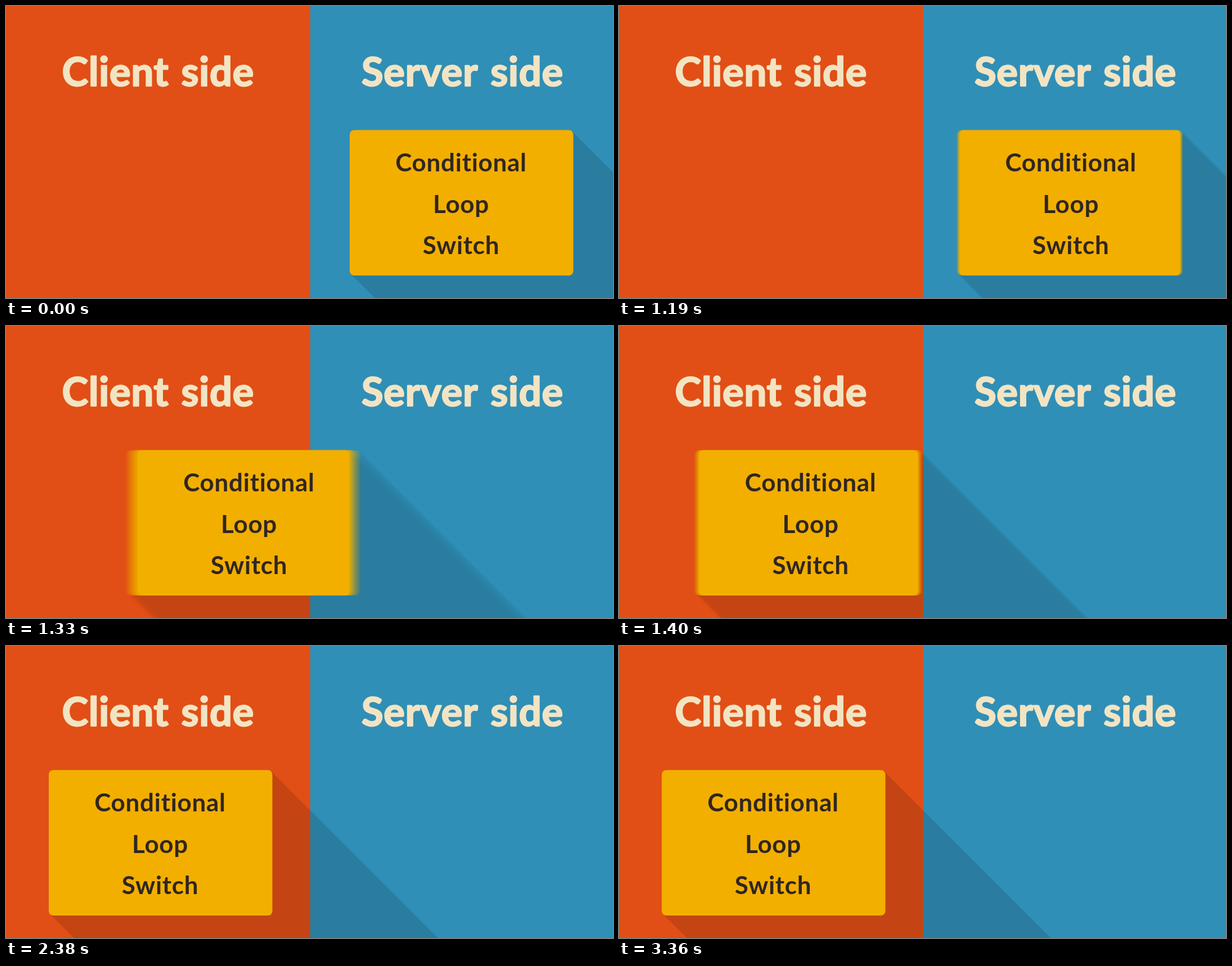
Animation of 1079 by 519 pixels, one loop 3570 ms. Source, as an HTML page with a canvas:

```html
<!DOCTYPE html>
<html lang="en">
<head>
<meta charset="utf-8">
<title>Client side / Server side</title>
<style>
  html, body { margin: 0; width: 100%; height: 100%; overflow: hidden; background: #308fb6; }
  canvas { display: block; }
</style>
</head>
<body>
<canvas id="stage" width="1079" height="519"></canvas>
<script>
const W = 1079, H = 519;
const LOOP = 3570, STEP = 70;
const FONT = 'Lato, "Open Sans", sans-serif';
const card = { from: 611, to: 76, y: 220.4, w: 397.5, h: 258.6, r: 8 };
const move = { start: 1156, length: 465, ease: 0.45 };
const SHUTTER = 12.5, SAMPLES = 16;

const ctx = document.getElementById('stage').getContext('2d');
const layer = document.createElement('canvas');
layer.width = W;
layer.height = H;
const scene = layer.getContext('2d');
scene.filter = 'blur(0.6px)';

// Bezier easing with handles (ease, 0) and (0, 1), solved by bisection.
function eased(x) {
  if (x <= 0) return 0;
  if (x >= 1) return 1;
  let lo = 0, hi = 1;
  for (let i = 0; i < 30; i++) {
    const s = (lo + hi) / 2;
    const at = 3 * (1 - s) ** 2 * s * move.ease + s ** 3;
    if (at < x) lo = s; else hi = s;
  }
  return lo * lo * (3 - 2 * lo);
}

function cardX(t) {
  return card.from + (card.to - card.from) * eased((t - move.start) / move.length);
}

function drawShadow(c, x) {
  const inset = card.r * (1 - Math.SQRT1_2);
  const far = 600;
  const right = x + card.w - inset, top = card.y + inset;
  const left = x + inset, bottom = card.y + card.h - inset;
  c.fillStyle = 'rgba(0, 0, 0, 0.127)';
  c.beginPath();
  c.moveTo(right, top);
  c.lineTo(right + far, top + far);
  c.lineTo(left + far, bottom + far);
  c.lineTo(left, bottom);
  c.fill();
}

// Shapes reach past the stage so that its border stays free of softness.
function drawScene(x) {
  scene.fillStyle = '#308fb6';
  scene.fillRect(-20, -20, W + 40, H + 40);
  scene.fillStyle = '#e14f16';
  scene.fillRect(-20, -20, 560.7, H + 40);
  drawShadow(scene, x);
  scene.fillStyle = '#f2af00';
  scene.beginPath();
  scene.roundRect(x, card.y, card.w, card.h, card.r);
  scene.fill();
}

// Averages the scene over the open shutter while the card moves.
function drawBlurred(t) {
  const moving = Math.abs(cardX(t + SHUTTER) - cardX(t)) > 0.1;
  const count = moving ? SAMPLES : 1;
  for (let i = 0; i < count; i++) {
    drawScene(cardX(t + SHUTTER * i / SAMPLES));
    ctx.globalAlpha = 1 / (i + 1);
    ctx.drawImage(layer, 0, 0);
  }
  ctx.globalAlpha = 1;
}

function setType(size, color, spacing, gap) {
  ctx.font = `700 ${size}px ${FONT}`;
  ctx.fillStyle = ctx.strokeStyle = color;
  ctx.letterSpacing = spacing + 'px';
  ctx.wordSpacing = gap + 'px';
  ctx.textAlign = 'center';
}

function drawTitle(text, x) {
  setType(70.5, '#f2e4c3', 0.8, 4);
  ctx.lineWidth = 2.4;
  ctx.lineJoin = 'round';
  ctx.fillText(text, x, 141.5);
  ctx.strokeText(text, x, 141.5);
}

function drawLabels(x) {
  setType(44, '#302621', 0.7, 0);
  ctx.fillText('Conditional', x, 293.5);
  ctx.fillText('Loop', x, 367.5);
  ctx.fillText('Switch', x, 440.5);
}

function draw(t) {
  drawBlurred(t);
  drawTitle('Client side', 270.4);
  drawTitle('Server side', 811.4);
  drawLabels(cardX(t) + 198);
}

let shown = -1;
function tick() {
  const t = Math.floor(performance.now() % LOOP / STEP) * STEP;
  if (t !== shown) draw(shown = t);
  requestAnimationFrame(tick);
}
tick();
</script>
</body>
</html>
```
